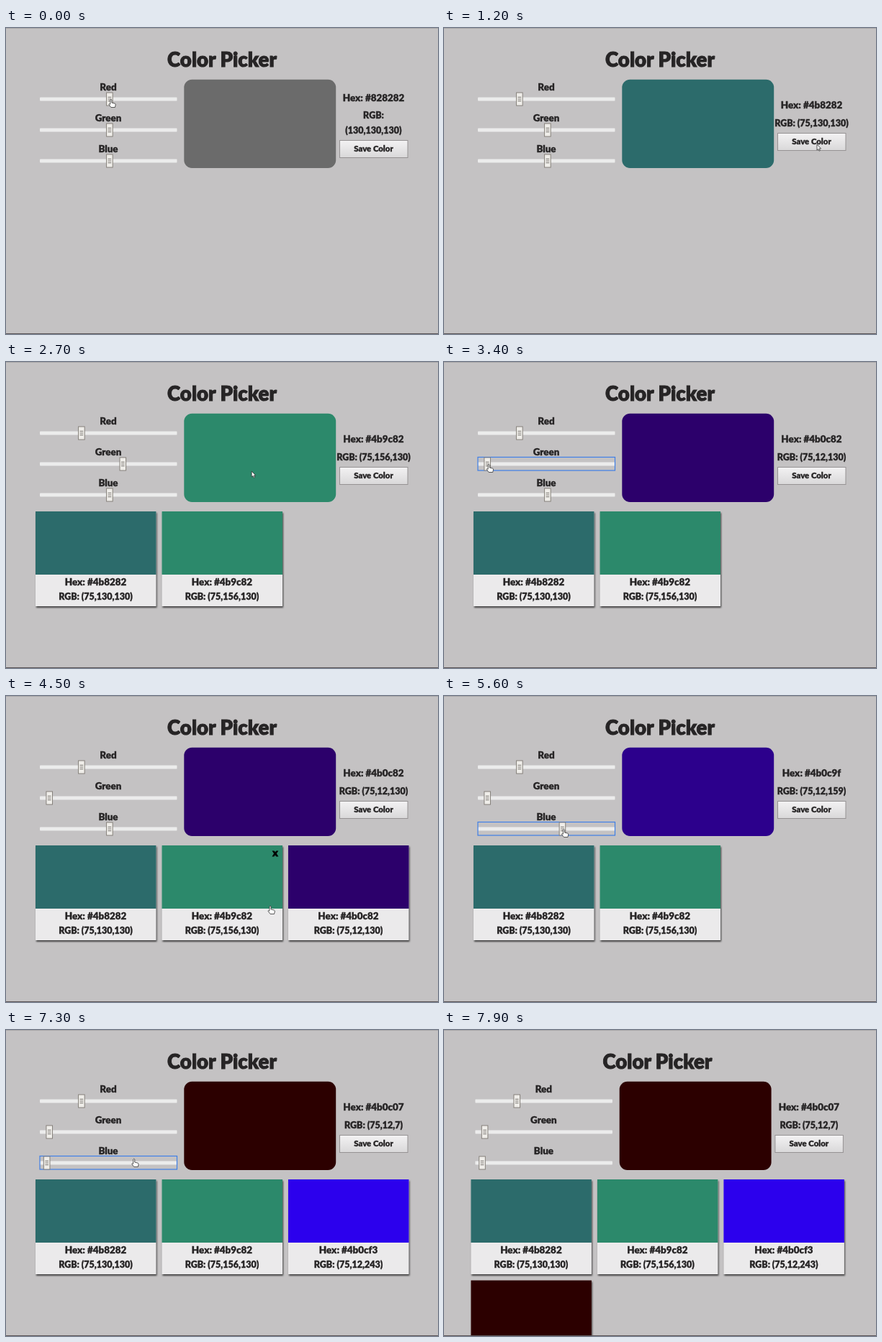
These frames come from a looping animation (600x426 px, 8000 ms). An HTML page:

```html
<!DOCTYPE html>
<html lang="en">
<head>
<meta charset="utf-8">
<title>Color Picker</title>
<style>
  html, body { margin: 0; width: 100%; height: 100%; overflow: hidden; background: #c4c2c3; }
  svg { display: block; width: 600px; height: 426px; }
  text {
    font: 900 13.4px Lato, "Open Sans", sans-serif; text-anchor: middle;
    fill: #262425; stroke: #262425; stroke-width: .35px;
  }
  .title { font-size: 27.6px; stroke-width: .9px; }
  .rgb { font-size: 12.5px; }
  .save { font-size: 11.4px; }
  .close { font-size: 13.5px; fill: #000; stroke: #000; stroke-width: .8px; }
  .card { filter: drop-shadow(1.5px 2px 1px #000a); }
</style>
</head>
<body>
<svg id="stage" viewBox="0 0 600 426">
  <defs>
    <linearGradient id="face" x2="0" y2="1">
      <stop stop-color="#f3f2f3"/><stop offset="1" stop-color="#d9d8d9"/>
    </linearGradient>
  </defs>
  <g id="page"></g>
  <path d="M0 .5H600" stroke="#a9a7a8"/>
  <path d="M0 425.5H600" stroke="#5c5658"/>
  <g id="pointer" fill="#fff" stroke="#333" stroke-width=".8" stroke-linejoin="round"></g>
</svg>
<script>
const LOOP = 8000, STEP = 100;
const page = document.getElementById('page');
const pointer = document.getElementById('pointer');

// What the user does; the pointer glides from each action to the next
const drag = (at, end, slider, to) => ({ at, end, slider, to });
const save = at => ({ at, save: true, spot: [518, 162] });
const move = (at, x, y) => ({ at, spot: [x, y] });
const remove = (at, index) => ({ at, remove: index, spot: [cardLeft(index) + 157, cardTop(index) + 10] });

const actions = [
  drag(100, 700, 0, 75), save(1200),
  drag(1700, 1900, 1, 156), save(2500),
  drag(2900, 3400, 1, 12), save(3900),
  move(4500, 367, 292), remove(5000, 2),
  drag(5500, 5800, 2, 243), save(6100),
  move(6400, 361, 191), drag(6700, 7200, 2, 7),
  save(7500), move(7800, 566, 430)
];

function cardLeft(i) { return 41 + 175.5 * (i % 3); }
function cardTop(i) { return 208 + 140.5 * Math.floor(i / 3); }
const thumbX = value => 51.7 + value * 0.709;
const sliderY = i => 99 + 43 * i;
const mix = (a, b, p) => a + (b - a) * p;

function progress(t, from, to) {
  const p = Math.max(0, Math.min(1, (t - from) / (to - from)));
  return p * p * (3 - 2 * p);
}

function stateAt(t) {
  const s = { color: [130, 130, 130], cards: [], focus: -1 };
  const thumb = i => [thumbX(s.color[i]) + 2, sliderY(i)];
  let free = 0, spot = thumb(0);
  for (const a of actions) {
    const goal = a.spot || thumb(a.slider), p = progress(t, free, a.at);
    spot = spot.map((v, i) => mix(v, goal[i], p));
    if (t < a.at) break;
    if (a.to !== undefined) {
      s.focus = a.slider;
      s.color[a.slider] = Math.round(mix(s.color[a.slider], a.to, progress(t, a.at, a.end)));
      spot = thumb(a.slider);
    } else if (a.save) {
      s.focus = -1;
      if (t > a.at) s.cards.push([...s.color]);
    } else if (a.remove !== undefined) {
      s.cards.splice(a.remove, 1);
    }
    free = a.end || a.at;
    if (t < free) break;
  }
  [s.x, s.y] = spot;
  return s;
}

const hex = c => '#' + c.map(v => v.toString(16).padStart(2, '0')).join('');
// Screen contrast deepens the colors
const shade = c => `rgb(${c.map(v => Math.max(0, Math.min(255, Math.round((v - 37) * 1.15))))})`;
const text = (s, x, y, cls = '') => `<text x="${x}" y="${y}" class="${cls}">${s}</text>`;
const rect = (x, y, w, h, fill, more = '') =>
  `<rect x="${x}" y="${y}" width="${w}" height="${h}" fill="${fill}" ${more}/>`;

function slider(name, i, value, focused) {
  const y = sliderY(i), x = thumbX(value);
  return text(name, 142, y - 12) +
    rect(47, y - 2.5, 190.5, 5, '#ececec', 'rx="1"') +
    (focused ? rect(47, y - 9.5, 190.5, 18.5, 'none', 'stroke="#3f7fe6" stroke-width="1.2"') : '') +
    rect(x - 4.3, y - 9, 8.6, 18, '#efede9', 'stroke="#85807a"') +
    `<path d="M${x - 2.3} ${y - 2.7}h4.6m-4.6 2.7h4.6m-4.6 2.7h4.6" stroke="#77736f"/>`;
}

function info(c) {
  const wrap = c.every(v => v > 99), shift = wrap ? 10 : 0, list = `(${c})`;
  return text('Hex: ' + hex(c), 510.5, 112 - shift) +
    (wrap ? text('RGB:', 510.5, 126, 'rgb') + text(list, 510.5, 146.5, 'rgb')
          : text('RGB: ' + list, 510.5, 136.5, 'rgb')) +
    rect(463.5, 146.5 + shift, 94.5, 24, 'url(#face)', 'stroke="#959293"') +
    text('Save Color', 510.5, 162 + shift, 'save');
}

function isOver(i, x, y) {
  const dx = x - cardLeft(i), dy = y - cardTop(i);
  return dx > 0 && dx < 167.5 && dy > 0 && dy < 132;
}

function card(c, i, hover) {
  const left = cardLeft(i), top = cardTop(i), mid = left + 83.5;
  return `<g class="card">${rect(left, top, 167.5, 132, '#ebeaeb')}</g>` +
    rect(left, top, 167.5, 88, shade(c)) +
    text('Hex: ' + hex(c), mid, top + 103) +
    text(`RGB: (${c})`, mid, top + 123, 'rgb') +
    (hover ? text('x', left + 157.5, top + 14.5, 'close') : '');
}

function draw(t) {
  const { color, cards, focus, x, y } = stateAt(t);
  // The page recentres once it is tall enough to scroll
  page.setAttribute('transform', `translate(${cards.length > 3 ? -3.6 : 0} 0)`);
  page.innerHTML = text('Color Picker', 300, 54, 'title') +
    ['Red', 'Green', 'Blue'].map((name, i) => slider(name, i, color[i], focus === i)).join('') +
    rect(247.3, 71.7, 210.9, 123.2, shade(color), 'rx="11"') +
    info(color) +
    cards.map((c, i) => card(c, i, isOver(i, x, y))).join('');

  const onSlider = x > 46 && x < 238 && [0, 1, 2].some(i => Math.abs(y - sliderY(i)) < 10);
  const hand = 'M-1 1Q0-.8 1 1V5l4.5 1.2q1 .4.8 1.8L5.5 11.5H0L-3 7.5q0-1.5 2-.3Z';
  const arrow = 'M0 0V8L1.8 6.4 3 9.2 4.4 8.6 3.2 5.9H5.6Z';
  const pointing = onSlider || cards.some((c, i) => isOver(i, x, y));
  pointer.setAttribute('transform', `translate(${x} ${y})`);
  pointer.innerHTML = `<path d="${pointing ? hand : arrow}"/>`;
}

let last = -1;
function tick() {
  const t = Math.floor(performance.now() % LOOP / STEP) * STEP;
  if (t !== last) draw(last = t);
  requestAnimationFrame(tick);
}
tick();
</script>
</body>
</html>
```
